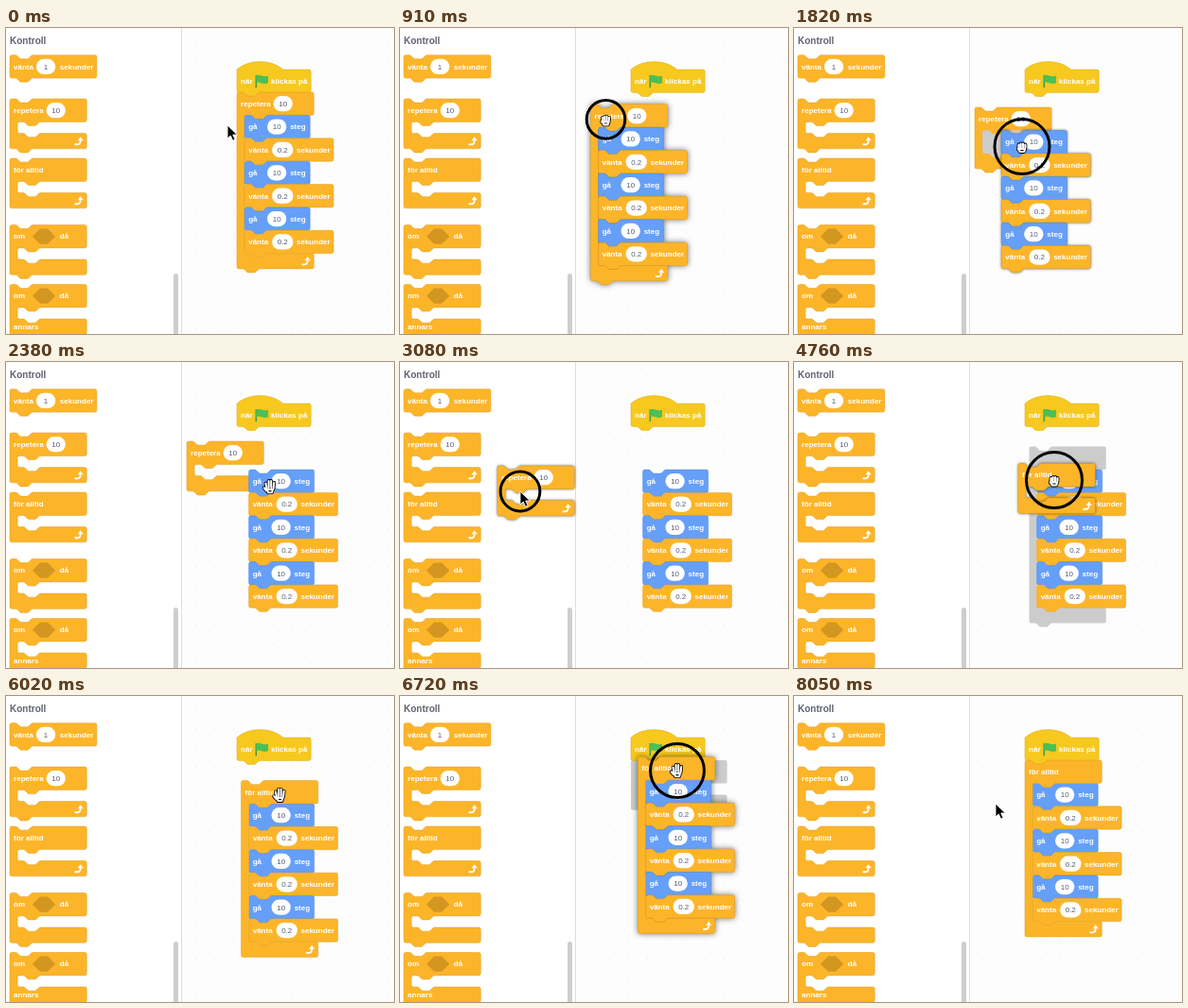
An HTML page for the animation above (8.12 s loop, 410 px wide and 324 px high).

```html
<!DOCTYPE html>
<html lang="sv">
<head>
<meta charset="utf-8">
<title>Kontroll</title>
<style>
  html, body { margin: 0; width: 100%; height: 100%; overflow: hidden; background: #fff; }
  svg { display: block; width: 410px; height: 324px; }
  text { font: bold 15.8px "Liberation Sans", Arial, sans-serif; fill: #fff; }
  .num { font-weight: normal; fill: #575e75; text-anchor: middle; }
  .title { font-size: 10px; fill: #5f6270; }
  .control { fill: #fcb529; stroke: #e09c22; }
  .motion { fill: #659ff8; stroke: #4c87e0; }
  .event { fill: #f7c91f; stroke: #deac18; }
  .mark { fill: #ccc; }
  .drag { filter: drop-shadow(0 0 3px rgba(0, 0, 0, .55)); }
  .hand { fill: none; stroke-linecap: round; stroke-linejoin: round; }
</style>
</head>
<body>
<svg id="stage" viewBox="0 0 410 324"></svg>
<script>
const LOOP = 8120, STEP = 70, S = 0.508, ROW = 48, SNAP = 26;
const stage = document.getElementById('stage');

function add(parent, tag, attrs = {}, text) {
  const el = document.createElementNS('http://www.w3.org/2000/svg', tag);
  for (const k in attrs) el.setAttribute(k, attrs[k]);
  if (text) el.textContent = text;
  parent.append(el);
  return el;
}

// Block outlines, in block units
const IN = 'c2 0 3 1 4 2l4 4c1 1 2 2 4 2h12c2 0 3-1 4-2l4-4c1-1 2-2 4-2';
const OUT = 'c-2 0-3 1-4 2l-4 4c-1 1-2 2-4 2h-12c-2 0-3-1-4-2l-4-4c-1-1-2-2-4-2';
const TOP = 'M0 4A4 4 0 0 1 4 0H12' + IN;
const CAP = 'H4a4 4 0 0 1-4-4z';
const FOOT = 'H48' + OUT + CAP;
const side = (w, h) => `H${w - 4}a4 4 0 0 1 4 4v${h - 8}a4 4 0 0 1-4 4`;
const mouth = h => `H64${OUT}h-8a4 4 0 0 0-4 4v${h - 8}a4 4 0 0 0 4 4h8${IN}`;
const slab = w => TOP + side(w, ROW) + FOOT;
const cee = (w, gaps, end = FOOT) =>
  TOP + side(w, ROW) + gaps.map(h => mouth(h) + side(w, 32)).join('') + end;

// Block parts
const place = (el, x, y) => el.setAttribute('transform', `translate(${x} ${y}) scale(${S})`);
function group(parent, x = 0, y = 0) {
  const g = add(parent, 'g');
  place(g, x, y);
  return g;
}
const shape = (g, kind, d) => add(g, 'path', { class: kind, d });
const label = (g, x, text, y = 29.5) => add(g, 'text', { x, y }, text);
function pill(g, x, text, w = 40) {
  add(g, 'rect', { x: x - w / 2, y: 8, width: w, height: 32, rx: 16, fill: '#fff' });
  add(g, 'text', { class: 'num', x, y: 29.5 }, text);
}
function loopIcon(g) {
  const icon = add(g, 'g');
  add(icon, 'path', { d: 'M-8 7h5q7 0 7-8', fill: 'none', stroke: '#fff', 'stroke-width': 3.5 });
  add(icon, 'path', { d: 'M-2-1h12l-6-8z', fill: '#fff' });
  return icon;
}
const setIcon = (icon, gap) => icon.setAttribute('transform', `translate(143 ${ROW + gap + 16})`);

function wait(g, secs, w, at, pillW) {
  shape(g, 'control', slab(w));
  label(g, 8, 'vänta');
  pill(g, at, secs, pillW);
  label(g, at + 29, 'sekunder');
}
function loopBlock(g, name, count, end) {
  const body = shape(g, 'control', '');
  label(g, 8, name);
  if (count) pill(g, 96, count);
  const icon = loopIcon(g);
  return gap => {
    body.setAttribute('d', cee(160, [gap], end));
    setIcon(icon, gap);
  };
}
function ifBlock(g, gaps) {
  shape(g, 'control', cee(160, gaps));
  label(g, 8, 'om');
  add(g, 'path', { d: 'M47 24l16-16h16l16 16-16 16h-16z', fill: '#d39721' });
  label(g, 104, 'då');
}

// Workspace and palette
add(stage, 'rect', { width: 410, height: 324, fill: '#fff' });
add(stage, 'rect', { x: 186, width: 224, height: 324, fill: '#fdfdfd' });
for (let y = 14; y < 324; y += 20.3)
  for (let x = 200; x < 410; x += 20.3)
    add(stage, 'rect', { x, y, width: 1, height: 1, fill: '#e6e6e6' });
add(stage, 'rect', { x: 185, width: 1, height: 324, fill: '#ddd' });
add(stage, 'rect', { x: 177, y: 260, width: 5, height: 70, rx: 2.5, fill: '#cecece' });
add(stage, 'text', { class: 'title', x: 4, y: 16.5 }, 'Kontroll');

wait(group(stage, 4, 28.7), '1', 181, 75);
loopBlock(group(stage, 4, 75), 'repetera', '10')(24);
loopBlock(group(stage, 4, 138), 'för alltid', '', CAP)(24);
ifBlock(group(stage, 4, 208.5), [24]);
const ifElse = group(stage, 4, 271.5);
ifBlock(ifElse, [24, 24]);
label(ifElse, 8, 'annars', 93);

// Script blocks
const loopMark = shape(group(stage), 'mark', '');
const hat = group(stage, 244, 44);
shape(hat, 'event', 'M0 0c25-22 71-22 96 0' + side(154, ROW) + FOOT);
label(hat, 8, 'när');
add(hat, 'path', { d: 'M40 12v26', stroke: '#45993d', 'stroke-width': 3 });
add(hat, 'path', { d: 'M40 13c8-5 14 5 25 0v15c-11 5-17-5-25 0z', fill: '#4cbf56' });
label(hat, 71, 'klickas på');

const pile = add(stage, 'g');
const rep = group(pile);
const setRep = loopBlock(rep, 'repetera', '10');
const moveMark = shape(group(pile), 'mark', slab(136));
const stack = group(pile);
for (let i = 0; i < 6; i++) {
  const g = add(stack, 'g', { transform: `translate(0 ${i * ROW})` });
  if (i % 2) wait(g, '0.2', 185, 79, 44);
  else {
    shape(g, 'motion', slab(136));
    label(g, 8, 'gå');
    pill(g, 67, '10');
    label(g, 94.5, 'steg');
  }
}
const ever = group(pile);
const setEver = loopBlock(ever, 'för alltid', '', CAP);

// Pointer
const ring = add(stage, 'circle', { fill: 'none', stroke: '#000', 'stroke-width': 3 });
const pointer = add(stage, 'g');
function hand(d) {
  const g = add(pointer, 'g', { class: 'hand' });
  add(g, 'path', { d, stroke: '#000', 'stroke-width': 3.8 });
  add(g, 'path', { d, stroke: '#fff', 'stroke-width': 2.1 });
  return g;
}
const looks = {
  arrow: add(pointer, 'path', {
    d: 'M0 0v14l3.3-3 2.3 5.2 2.5-1.1-2.3-5.1h4.6z', stroke: '#fff', 'stroke-width': 0.9
  }),
  open: hand('M-3.5 2L-4.5-3.5M-1.4 1V-6M1.2 1V-6M3.6 2L4.2-4M-4 4L-6.3 1.3M-3 3h6l-1 3.2h-4z'),
  fist: hand('M-3.5 1V-2M-1.3 1V-3M1.1 1V-3M3.5 1V-2M-4.2 3v-1M-3.4 2.5h6.6l-1 3h-4.4z')
};

// Tracks: [ms, x, y]
const HOME = [244, 68], WRAP = [248.5, 89.6];
const path = {
  pointer: [
    [0, 234, 103], [420, 260, 84], [560, 260, 84], [1050, 207, 100], [1120, 207, 100],
    [1320, 221, 126], [1540, 221, 126], [1820, 241, 125.5], [2240, 279, 132], [2380, 279, 132],
    [2660, 231, 97], [2720, 231, 97], [3080, 127, 137], [3290, 78, 146], [3430, 76, 147],
    [3710, 42, 155], [3840, 42, 155], [4200, 201, 143], [4480, 262, 126], [4760, 275, 125],
    [4900, 277, 124], [5040, 277, 124], [6160, 290, 104], [6300, 290, 104], [6720, 293, 79],
    [6930, 293, 79], [7560, 226, 109], [8050, 213, 114]
  ],
  rep: [
    [560, ...HOME], [1050, 191, 84], [2740, 191, 84], [3080, 103, 110], [3320, 44, 121]
  ],
  stack: [[1540, 199.1, 108.4], [1820, 219.3, 108.5], [2240, 256.6, 114]],
  ever: [
    [3860, 4, 138], [4200, 138, 130], [4480, 219, 110], [4760, 237, 107.5], [4870, 239, 106.5]
  ],
  home: [[6300, ...WRAP], [6720, 251.5, 64.5], [6790, 251.5, 64.5]]
};
const presses = [[560, 1050], [1320, 2250], [2720, 3330], [3840, 4890], [6230, 6790]];
const looksAt = [
  [0, 'arrow'], [350, 'open'], [560, 'fist'], [1050, 'open'], [1320, 'fist'], [2250, 'open'],
  [2450, 'arrow'], [2660, 'open'], [2720, 'fist'], [2900, 'arrow'], [4250, 'fist'],
  [4890, 'open'], [7200, 'arrow']
];

// Monotone cubic through the points of a track
function at(track, t) {
  const end = track.length - 1;
  if (t <= track[0][0]) return track[0].slice(1);
  if (t >= track[end][0]) return track[end].slice(1);
  const i = track.findIndex(p => p[0] > t) - 1;
  const [a, b] = [track[i], track[i + 1]], dt = b[0] - a[0], u = (t - a[0]) / dt;
  return [1, 2].map(k => {
    const slope = j => track[j] && track[j + 1]
      ? (track[j + 1][k] - track[j][k]) / (track[j + 1][0] - track[j][0]) : 0;
    const tangent = (p, q) => p * q > 0 ? 2 * p * q / (p + q) : 0;
    const m0 = tangent(slope(i - 1), slope(i)) * dt, m1 = tangent(slope(i), slope(i + 1)) * dt;
    const d = b[k] - a[k];
    return a[k] + u * (m0 + u * (3 * d - 2 * m0 - m1 + u * (m0 + m1 - 2 * d)));
  });
}

const show = (el, on) => el.setAttribute('visibility', on ? 'visible' : 'hidden');
const lift = (el, on) => el.classList.toggle('drag', on);
const near = (a, b) => Math.hypot(a[0] - b[0], a[1] - b[1]) < SNAP;
const inside = ([x, y]) => [x + 16 * S, y + ROW * S];

function markLoop(spot, w, gap) {
  show(loopMark, !!spot);
  if (!spot) return;
  place(loopMark.parentNode, ...spot);
  loopMark.setAttribute('d', cee(w, [gap]));
}

function draw(t) {
  const full = 6 * ROW;
  const press = presses.findIndex(p => t >= p[0] && t < p[1]);
  const repAt = at(path.rep, t);
  const everAt = t < 4890 ? at(path.ever, t) : t < 6790 ? at(path.home, t) : HOME;
  const stackAt = t < 1320 ? inside(repAt) : t < 4890 ? at(path.stack, t) : inside(everAt);

  const slot = inside(repAt);
  const slotMark = press === 1 && near(stackAt, slot);
  setRep(t < 1320 ? full : slotMark ? ROW : 24);
  setEver(t < 4890 ? 24 : full);
  place(rep, ...repAt);
  place(stack, ...stackAt);
  place(ever, ...everAt);
  place(moveMark.parentNode, ...slot);
  show(rep, t < 3330);
  show(ever, t >= 3840);
  show(moveMark, slotMark);

  if (press === 0 && near(repAt, HOME) || press === 4 && near(everAt, HOME)) markLoop(HOME, 200, 24);
  else if (press === 3 && near(everAt, WRAP)) markLoop(WRAP, 160, full);
  else markLoop(null);

  lift(pile, press === 0 || press === 4);
  lift(stack, press === 1);
  lift(rep, press === 2);
  lift(ever, press === 3);

  const [x, y] = at(path.pointer, t);
  pointer.setAttribute('transform', `translate(${x} ${y})`);
  const look = looksAt.filter(l => l[0] <= t).pop()[1];
  for (const k in looks) show(looks[k], k === look);
  show(ring, press >= 0);
  if (press >= 0) {
    ring.setAttribute('cx', x);
    ring.setAttribute('cy', y);
    ring.setAttribute('r', Math.min(29.5, 0.058 * (t - presses[press][0])));
  }
}

const start = performance.now();
function tick() {
  const t = (performance.now() - start) % LOOP;
  draw(Math.floor(t / STEP) * STEP);
  requestAnimationFrame(tick);
}
tick();
</script>
</body>
</html>
```
